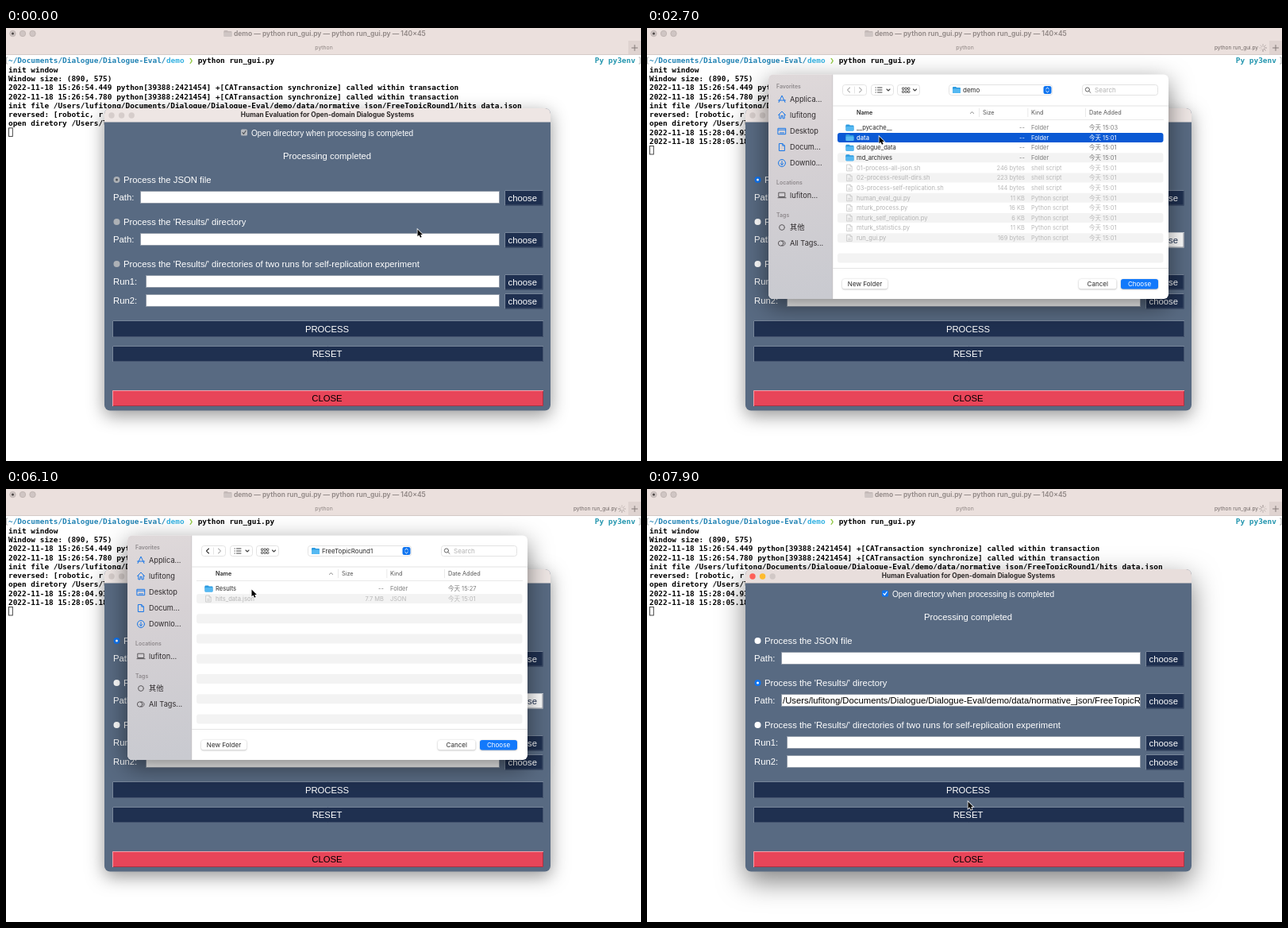
These frames come from a looping animation (800 px wide and 545 px high, 8 s). An HTML page with a canvas:

```html
<!DOCTYPE html>
<html lang="en">
<head>
<meta charset="utf-8">
<title>Evaluation GUI demo</title>
<style>
html, body { margin: 0; width: 100%; height: 100%; overflow: hidden; background: #fff; }
canvas { display: block; width: 800px; height: 545px; }
</style>
</head>
<body>
<canvas id="stage" width="800" height="545"></canvas>
<script>
const c = document.getElementById('stage').getContext('2d');
const LOOP = 8000, STEP = 100;
const UI = 'Inter, "Noto Sans CJK SC", "Noto Sans CJK", sans-serif';
const ARIAL = '"Liberation Sans", Arial, sans-serif';
const MONO = '"DejaVu Sans Mono", monospace';
const USER = 'lufitong';
const EVAL_DIR = `/Users/${USER}/Documents/Dialogue/Dialogue-Eval/demo/data/normative_json/FreeTopicRound1`;

const OPEN = 1600, SHUT = 7500;              // file dialog
const FOCUS = 800, LOG1 = 1200, LOG2 = 1500;
const NAVY = '#1f3050', SLATE = '#586a82', BLUE = '#0f74f0';

// y is the middle of the capitals
function text(s, x, y, size, color, { font = UI, weight = 400, align = 'left' } = {}) {
  c.font = `${weight} ${size}px ${font}`;
  c.textAlign = align;
  c.fillStyle = color;
  c.fillText(s, x, y + size * 0.36);
}

function box(x, y, w, h, r, fill, stroke) {
  c.beginPath();
  c.roundRect(x, y, w, h, r);
  if (fill) { c.fillStyle = fill; c.fill(); }
  if (stroke) { c.strokeStyle = stroke; c.lineWidth = 1; c.stroke(); }
}

function disc(x, y, r, fill, stroke) {
  c.beginPath();
  c.arc(x, y, r, 0, 7);
  if (fill) { c.fillStyle = fill; c.fill(); }
  if (stroke) { c.strokeStyle = stroke; c.lineWidth = 0.8; c.stroke(); }
}

function lines(x, y, d, color, width = 1) {
  c.save();
  c.translate(x, y);
  c.strokeStyle = color;
  c.lineWidth = width;
  c.lineCap = c.lineJoin = 'round';
  c.stroke(new Path2D(d));
  c.restore();
}

function shadow(blur, dy, alpha, draw) {
  c.save();
  c.shadowBlur = blur;
  c.shadowOffsetY = dy;
  c.shadowColor = `rgba(0,0,0,${alpha})`;
  draw();
  c.restore();
}

function folder(x, y, tab = '#2d9be0', front = '#56b9f2') {
  box(x, y - 4, 5, 4, 1, tab);
  box(x, y - 3, 10, 7, 1, tab);
  box(x, y - 1.5, 10, 5.5, 1, front);
}

function terminal(t) {
  c.fillStyle = '#fff';
  c.fillRect(0, 0, 800, 545);
  c.fillStyle = '#ebe0dd';
  c.fillRect(0, 0, 800, 34);
  c.fillStyle = '#dfd3d0';
  c.fillRect(784, 16, 16, 17);
  c.fillStyle = '#d5cac8';
  c.fillRect(0, 33, 800, 1);
  for (const x of [8.5, 21, 33.5]) disc(x, 7, 3.7, '#cfc5c3', '#bbb0ae');
  disc(8.5, 7, 1.5, '#4c4645');
  folder(274.5, 7, '#c3b9b7', '#cfc6c4');
  text('demo — python run_gui.py — python run_gui.py — 140×45', 287, 7, 8.5, '#8e8583', { weight: 600 });
  text('python', 400.5, 25, 6.8, '#8e8583', { align: 'center' });
  lines(792, 25, 'M-3.5 0H3.5M0 -3.5V3.5', '#847b79');

  if (t >= LOG2) {
    text('python run_gui.py', 715, 25, 6.5, '#6f6765');
    for (let i = 0; i < 8; i++) {
      const a = i * Math.PI / 4, age = (i + 8 - (t / STEP) % 8) % 8;
      c.globalAlpha = 0.25 + age * 0.09;
      lines(776, 25, `M${2 * Math.cos(a)} ${2 * Math.sin(a)}L${4.5 * Math.cos(a)} ${4.5 * Math.sin(a)}`, '#857c7a', 0.9);
    }
    c.globalAlpha = 1;
  }

  const adv = 5.683, bold = { font: MONO, weight: 700 };
  const mono = (s, col, row, color = '#000') => text(s, 3 + col * adv, 41 + row * 11.3, 9.44, color, bold);
  const warn = time => `2022-11-18 ${time} python[39388:2421454] +[CATransaction synchronize] called within transaction`;
  lines(0, 0, 'M2 37H.5V45H2M797.5 37H799V45H797.5', '#a9a9a9', 0.8);
  mono('~/Documents/Dialogue/Dialogue-Eval/', 0, 0, '#2183b4');
  mono('demo', 35, 0, '#35b2e2');
  mono('❯', 40, 0, '#8cc63c');
  mono('python run_gui.py', 42, 0);
  mono('Py py3env', 130, 0, '#2295ae');
  const log = ['init window', 'Window size: (890, 575)', warn('15:26:54.449'), warn('15:26:54.780'),
    `init file ${EVAL_DIR}/hits_data.json`, 'reversed: [robotic, r', `open diretory /Users/${USER}`];
  if (t >= LOG1) log.push(warn('15:28:04.936'));
  if (t >= LOG2) log.push(warn('15:28:05.183'));
  log.forEach((s, i) => mono(s, 0, i + 1));
  c.strokeStyle = '#333';
  c.lineWidth = 0.9;
  c.strokeRect(3.5, 41 + (log.length + 1) * 11.3 - 5.5, 4.8, 10.5);
}

function button(label, x, y, w, h, hot, fill = NAVY, ink = '#fff') {
  box(x, y, w, h, 0, hot ? '#fff' : fill);
  c.lineWidth = 1;
  c.strokeStyle = hot ? '#c9ced6' : fill === NAVY ? '#78869a' : '#f4a0aa';
  c.beginPath();
  c.moveTo(x + 0.5, y + h);
  c.lineTo(x + 0.5, y + 0.5);
  c.lineTo(x + w, y + 0.5);
  c.stroke();
  c.strokeStyle = hot ? '#8d939e' : fill === NAVY ? '#43526d' : '#a83343';
  c.beginPath();
  c.moveTo(x + w - 0.5, y + 1);
  c.lineTo(x + w - 0.5, y + h - 0.5);
  c.lineTo(x + 1, y + h - 0.5);
  c.stroke();
  text(label, w < 60 ? x + 22.7 : x + w / 2 - 1, y + h / 2, 11.3, hot ? NAVY : ink, { font: ARIAL, align: 'center' });
}

function appWindow(t, mouse) {
  const modal = t >= OPEN && t < SHUT, done = t >= SHUT;
  const lit = t >= FOCUS, active = lit && !modal;
  const frame = () => box(124, 101, 562, 380.5, 7, SLATE);
  if (active) shadow(34, 12, 0.5, frame);
  else shadow(22, 6, 0.42, frame);
  box(124, 101, 562, 17.5, [7, 7, 0, 0], active ? '#e8dedc' : '#eee6e4');
  const dots = active ? ['#fe5f57', '#febb2e', '#d1c8c6'] : Array(3).fill('#d6cdcb');
  dots.forEach((d, i) => disc(133 + i * 12.6, 110, 3.7, d));
  text('Human Evaluation for Open-domain Dialogue Systems', 405, 109.5, 8.25, '#2b2727', { weight: 700, align: 'center' });

  const say = (s, x, y, size = 11.3) => text(s, x, y, size, '#fff', { font: ARIAL });
  box(296, 127.5, 8, 8, 1.5, lit ? BLUE : '#b5b8bd');
  lines(300, 131.5, 'M-2 .2L-.6 1.8L2.1 -2', lit ? '#fff' : '#50545b', 1.2);
  say('Open directory when processing is completed', 309, 132, 10.1);
  say('Processing completed', 349, 161);

  ['the JSON file', "the 'Results/' directory", "the 'Results/' directories of two runs for self-replication experiment"].forEach((s, i) => {
    const y = 191 + i * 53, on = i === (done ? 1 : 0);
    disc(139.5, y, 4, lit ? (on ? BLUE : '#fff') : '#adb1b6');
    if (on) disc(139.5, y, 1.5, lit ? '#fff' : '#4e535b');
    say('Process ' + s, 148, y);
  });

  const inside = (x, y, w, h) => mouse.x >= x && mouse.x < x + w && mouse.y >= y && mouse.y < y + h;
  const press = (label, x, y, w, h, ...colors) =>
    button(label, x, y, w, h, active && inside(x, y, w, h) || modal && y === 257, ...colors);
  [['Path:', 213], ['Path:', 266], ['Run1:', 319], ['Run2:', 343]].forEach(([label, y], i) => {
    const x = i < 2 ? 169.5 : 176.5;
    say(label, 135, y);
    box(x, y - 7.5, 621.5 - x, 15, 0, '#fff', '#8d97a5');
    press('choose', 628, y - 9, 48.5, 19.5);
  });
  if (done) {
    c.save();
    c.beginPath();
    c.rect(170, 258, 451, 16);
    c.clip();
    text(EVAL_DIR, 171, 266, 11.3, '#000', { font: ARIAL });
    c.restore();
  }
  press('PROCESS', 134, 368, 543, 21);
  press('RESET', 134, 400, 543, 20);
  press('CLOSE', 134, 456, 543, 20, '#e84559', '#000');
}

const dir = (name, time = '15:01') => ({ name, size: '--', kind: 'Folder', time });
const file = (name, size, kind) => ({ name, size, kind, time: '15:01', dim: true });
const sh = (name, n) => file(name + '.sh', n + ' bytes', 'shell script');
const py = (name, size) => file(name + '.py', size, 'Python script');
// each folder opens at `at`; row `row` is selected from `pick`
const folders = [
  { at: 0, name: 'demo', pick: 2500, row: 1, list: [dir('__pycache__', '15:03'), dir('data'), dir('dialogue_data'), dir('md_archives'),
    sh('01-process-all-json', 246), sh('02-process-result-dirs', 223), sh('03-process-self-replication', 144),
    py('human_eval_gui', '11 KB'), py('mturk_process', '16 KB'), py('mturk_self_replication', '6 KB'),
    py('mturk_statistics', '11 KB'), py('run_gui', '169 bytes')] },
  { at: 3000, name: 'data', pick: 4300, row: 0, list: [dir('normative_json'), dir('raw_mturk_csv')] },
  { at: 4500, name: 'normative_json', pick: 5300, row: 0, list: [dir('FreeTopicRound1')] },
  { at: 5500, name: 'FreeTopicRound1', pick: 6500, row: 0, list: [dir('Results', '15:27'), file('hits_data.json', '7.7 MB', 'JSON')] },
];

const sidebar = [
  [89.5, 'Applica...', 'M-4 4L0 -4.5L4 4M-4.5 1.5H4.5'],
  [109.5, USER, 'M-4.5 0L0 -4.5L4.5 0M-3.2 -1V4.3H-1V1H1V4.3H3.2V-1'],
  [130, 'Desktop', 'M-4.7 -3.7H4.7V3.7H-4.7ZM-4.7 -1.8H4.7M-2.5 1.9H2.5'],
  [150, 'Docum...', 'M-3.2 -4.5H.8L3.4 -1.9V4.5H-3.2ZM.8 -4.5V-1.9H3.4'],
  [170, 'Downlo...', 'M4.5 0A4.5 4.5 0 1 1 -4.5 0A4.5 4.5 0 1 1 4.5 0M0 -2.3V2.3M-1.8 .6L0 2.4L1.8 .6'],
  [210.5, USER.slice(0, 7) + '...', 'M-3.8 -3.3H3.8V2H-3.8ZM-5 3.2H5'],
  [251, '其他', 'M3.4 0A3.4 3.4 0 1 1 -3.4 0A3.4 3.4 0 1 1 3.4 0'],
  [271, 'All Tags...', 'M1.8 0A3.2 3.2 0 1 1 -4.6 0A3.2 3.2 0 1 1 1.8 0M-.5 -2.9A3.2 3.2 0 1 1 -.5 2.9'],
];

function dialog(t) {
  const here = folders.findLast(f => t >= f.at), ink = '#2a2a2a';
  shadow(30, 9, 0.5, () => box(153, 58.5, 504, 282.5, 6, '#fff'));
  const tint = c.createLinearGradient(153, 58, 200, 341);
  tint.addColorStop(0, '#dfd9da');
  tint.addColorStop(0.35, '#d6d1d4');
  tint.addColorStop(1, '#c9cad0');
  box(153, 58.5, 81, 282.5, [6, 0, 0, 6], tint);
  c.fillStyle = '#c4bfc2';
  c.fillRect(233.5, 58.5, 0.7, 282.5);

  [['Favorites', 73], ['Locations', 194.5], ['Tags', 235]].forEach(([s, y]) =>
    text(s, 163, y, 6.95, '#8d888b', { weight: 600 }));
  sidebar.forEach(([y, s, d], i) => {
    lines(170, y, d, i < 5 ? '#1877e8' : '#5b585b', 1);
    text(s, 180, y, 9.2, '#2f2b2d');
  });

  // toolbar
  const chip = (x, w) => box(x, 71.5, w, 13, 3, '#fff', '#e3e3e3');
  chip(246.5, 30);
  chip(282.5, 28);
  chip(315.5, 28);
  chip(380.5, 130);
  chip(548.5, 95);
  lines(261.5, 78, 'M0 -4V4', '#ddd', 0.8);
  lines(254, 78, 'M1.5 -3L-1.5 0L1.5 3', here.at ? '#333' : '#b5b5b5', 1.1);
  lines(269, 78, 'M-1.5 -3L1.5 0L-1.5 3', '#b5b5b5', 1.1);
  lines(292, 78, 'M-4 -3H-3.6M-4 0H-3.6M-4 3H-3.6M-1.5 -3H4M-1.5 0H4M-1.5 3H4', '#444');
  for (let i = 0; i < 6; i++) box(321.5 + i % 3 * 3.5, 75 + (i / 3 | 0) * 4, 2.4, 2.4, 0.5, null, '#555');
  for (const x of [304, 337.5]) lines(x, 78, 'M-2 -1L0 1L2 -1', '#444', 1.1);
  folder(385, 78);
  text(here.name, 398, 78, 8, ink);
  box(499.5, 73, 10, 10, 2.5, BLUE);
  lines(504.5, 78, 'M-1.8 -1.3L0 -3L1.8 -1.3M-1.8 1.3L0 3L1.8 1.3', '#fff', 1);
  lines(555.5, 77.5, 'M2 0A2.6 2.6 0 1 1 -3.2 0A2.6 2.6 0 1 1 2 0M1.3 1.9L3.5 4', '#555', 0.9);
  text('Search', 564, 78, 8.1, '#b2b2b2');

  // column heads
  c.fillStyle = '#e4e4e4';
  c.fillRect(234, 97.5, 423, 1);
  c.fillRect(240, 115, 411, 0.8);
  c.fillRect(234, 302, 423, 1);
  for (const x of [418, 479.5, 552]) c.fillRect(x, 101, 0.8, 11);
  text('Name', 264, 106.5, 7.2, ink, { weight: 600 });
  [['Size', 423], ['Kind', 484], ['Date Added', 557]].forEach(([s, x]) => text(s, x, 106.5, 7.3, '#555'));
  lines(409.5, 106.5, 'M-2 1L0 -1L2 1', '#777', 0.9);

  for (let i = 0; i < 14; i++) {
    const y = 125.5 + i * 12.62, row = here.list[i];
    const picked = i === here.row && t >= here.pick;
    if (picked || i % 2) box(240, y - 6, 410.5, 12, 3, picked ? '#0a59d4' : '#f3f3f3');
    if (!row) continue;
    const main = picked ? '#fff' : row.dim ? '#b4b4b4' : ink;
    const side = picked ? '#fff' : row.dim ? '#b9b9b9' : '#7c7c7c';
    if (row.dim) lines(255, y, 'M-3 -4H1L3.2 -1.8V4H-3ZM1 -4V-1.8H3.2M-1.3 .5H1.4M-1.3 2.2H1.4', '#c6c6c6', 0.8);
    else folder(250.5, y);
    text(row.name, 264, y, 7.6, main, { weight: picked ? 500 : 400 });
    text(row.size, 476, y, 7.5, side, { align: 'right' });
    text(row.kind, 484, y, 7.5, side);
    text('今天 ' + row.time, 557, y, 7.5, side);
  }

  const push = (s, x, w, fill, color) => {
    shadow(2, 0.5, 0.35, () => box(x, 316, w, 12.5, 3, fill));
    text(s, x + w / 2, 322, 8.05, color, { align: 'center' });
  };
  push('New Folder', 246, 57, '#fff', ink);
  push('Cancel', 544, 47.5, '#fff', ink);
  push('Choose', 597, 47, t >= 7200 ? '#0a60d4' : '#1279fb', '#fff');
}

const track = [[0, 518, 253], [200, 518, 253], [900, 636, 262], [1700, 636, 262], [2400, 292, 136], [3000, 292, 136],
  [3700, 304, 126], [5500, 304, 126], [6000, 309, 126], [6600, 309, 126], [7100, 613, 323], [7500, 613, 323], [7900, 404, 393]];

function mouseAt(t) {
  const i = Math.max(1, track.findIndex(k => k[0] >= t));
  const [t0, x0, y0] = track[i - 1], [t1, x1, y1] = track[i];
  const u = (t - t0) / (t1 - t0), e = u * u * (3 - 2 * u);
  return { x: x0 + (x1 - x0) * e, y: y0 + (y1 - y0) * e };
}

function pointer({ x, y }) {
  c.save();
  c.translate(x, y);
  const arrow = new Path2D('M.5 .5V9.3L2.5 7.5L4 10.8L5.6 10.1L4.2 6.9H6.9Z');
  c.strokeStyle = '#fff';
  c.lineWidth = 1.5;
  c.stroke(arrow);
  c.fillStyle = '#000';
  c.fill(arrow);
  c.restore();
}

function draw() {
  const t = Math.floor(performance.now() % LOOP / STEP) * STEP;
  const mouse = mouseAt(t);
  terminal(t);
  appWindow(t, mouse);
  if (t >= OPEN && t < SHUT) dialog(t);
  pointer(mouse);
  requestAnimationFrame(draw);
}
draw();
</script>
</body>
</html>
```
